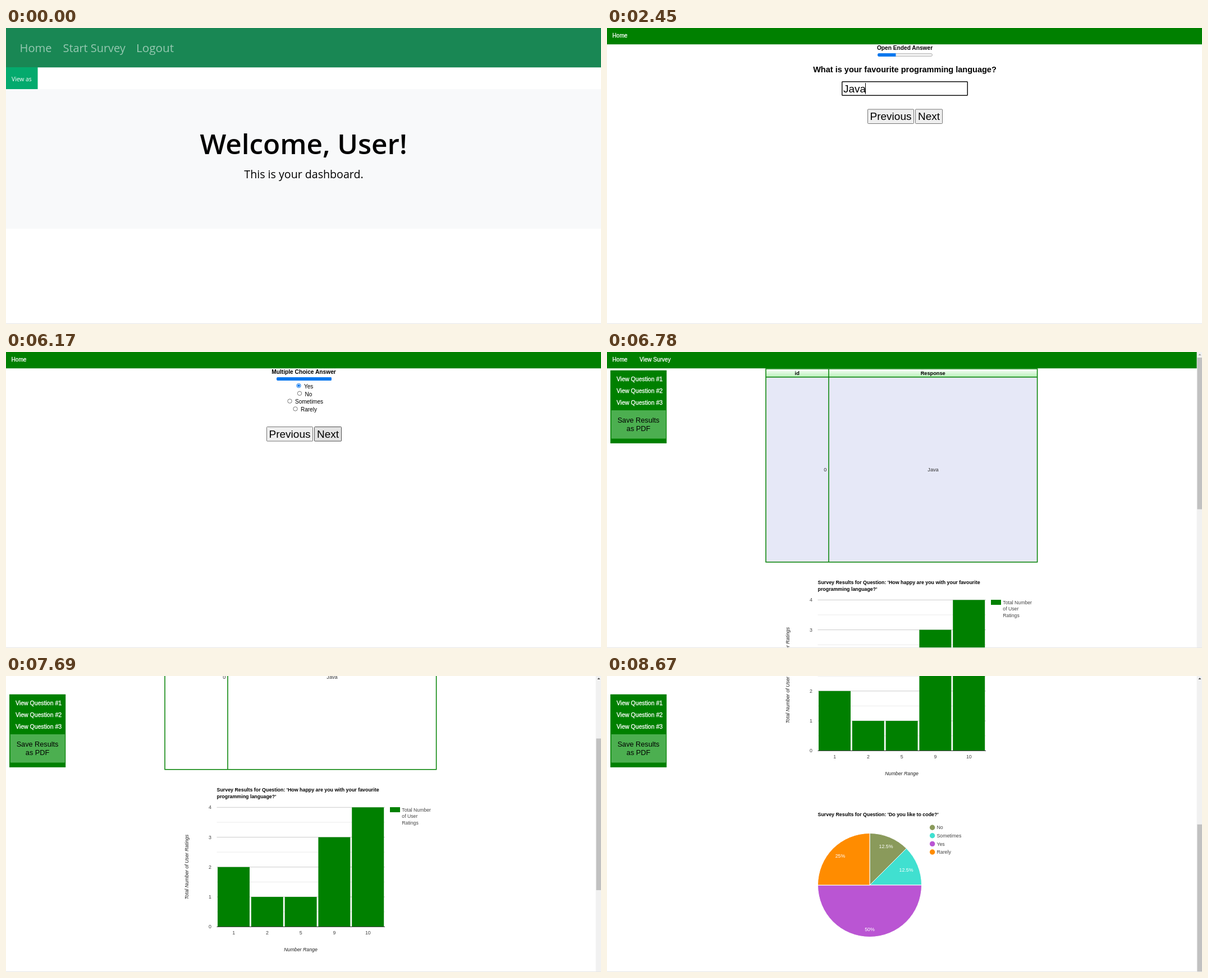
Recreate the animation shown at these times as an HTML page. Size 1060x528 px, loop 9.03 s.

```html
<!DOCTYPE html>
<html lang="en">
<head>
<meta charset="utf-8">
<title>Survey</title>
<style>
html, body { margin: 0; height: 100%; overflow: hidden; background: #fff; }
svg { display: block; font-family: "Liberation Sans", Arial, sans-serif; }
.ui { font-family: "Open Sans", "Noto Sans", sans-serif; }
.b { font-weight: 700; }
.i { font-style: italic; }
.link { stroke: #fff; stroke-width: .3px; }
</style>
</head>
<body>
<svg id="stage" width="1060" height="528" viewBox="0 0 1060 528"></svg>
<script>
const LOOP = 9030, GREEN = '#008000', MID = 530.5;
const stage = document.getElementById('stage');

const rect = (x, y, w, h, fill, more = '') =>
  `<rect x="${x}" y="${y}" width="${w}" height="${h}" fill="${fill}" ${more}/>`;
const text = (x, y, s, size, fill = '#000', anchor = 'start', more = '') =>
  `<text x="${x}" y="${y}" font-size="${size}" fill="${fill}" text-anchor="${anchor}" ${more}>${s}</text>`;
const line = (x1, y1, x2, y2, stroke, w = 1) =>
  `<path d="M${x1} ${y1}L${x2} ${y2}" stroke="${stroke}" stroke-width="${w}"/>`;
const mid = (x, y, s, size, fill, more) => text(x, y, s, size, fill, 'middle', more);
const bold = (y, s, size) => mid(MID, y, s, size, '#000', 'class="b"');
const link = (x, y, s, size) => text(x, y, s, size, '#fff', 'start', 'class="link"');

// Latest [time, value] entry that has begun
const at = (t, steps) => steps.filter(s => s[0] <= t).pop();
const val = (t, steps) => at(t, steps)[1];

function home(t) {
  const ui = 'class="ui"', dim = 'rgba(255,255,255,.55)';
  return rect(0, 0, 1060, 70.3, '#198754')
    + text(24.6, 43, 'Home', 20.1, dim, 'start', ui)
    + text(101.5, 43, 'Start Survey', 19.9, t < 540 ? dim : 'rgba(255,255,255,.75)', 'start', ui)
    + text(232, 43, 'Logout', 20.7, dim, 'start', ui)
    + rect(0, 70, 56.5, 39, '#04aa6d')
    + text(10, 94.5, 'View as', 10.3, '#fff', 'start', ui)
    + rect(0, 109, 1060, 249, '#f8f9fa')
    + mid(530, 224.5, 'Welcome, User!', 49.5, '#000', 'class="ui" font-weight="600"')
    + mid(MID, 268, 'This is your dashboard.', 19.6, '#000', ui);
}

const nav = () => rect(0, 0, 1060, 29.2, GREEN) + link(9.5, 17, 'Home', 10.1);

const header = (title, part) => nav() + bold(39, title, 10.2)
  + rect(482.5, 45.5, 97, 5, '#efefef', 'rx="2.5" stroke="#b5b5b5"')
  + `<path d="M${482 + 97.5 * part} 45H485a3 3 0 0 0 0 6H${482 + 97.5 * part}Z" fill="#0b78ee"/>`
  + (part === 1 ? rect(482, 45, 98, 6, '#0b78ee', 'rx="3"') : '');

function button(x, y, w, label, mode) {
  const [fill, edge] = { hover: ['#e3e3e3', '#4f4f4f'], press: ['#f5f5f5', '#8d8d8d'] }[mode] || ['#efefef', '#767676'];
  return rect(x + .5, y + .5, w - 1, 25.5, fill, `rx="1" stroke="${edge}"`)
    + mid(x + w / 2, y + 19.5, label, 19, '#000');
}

const buttons = (y, mode) => {
  const [which, how] = mode.split(' ');
  return button(464, y, 83, 'Previous', which === 'prev' && how)
    + button(549, y, 49, 'Next', which === 'next' && how);
};

function input(t, y, mode, typed) {
  const [since, value] = at(t, typed);
  const focus = mode === 'focus';
  const caret = 421.5 + [...value].reduce((w, c) => w + 19 * ('Jv'.includes(c) ? .5 : .556), 0);
  return (focus
      ? rect(418.75, y + .75, 223.5, 24.5, '#fff', 'rx="1" stroke="#101010" stroke-width="1.5"')
      : rect(418.5, y + .5, 224, 25, '#fff', `rx="1" stroke="${mode ? '#4f4f4f' : '#767676'}"`))
    + text(421, y + 19.5, value, 19)
    + (focus && t - since < 515 ? rect(Math.floor(caret) - 1, y + 3, 1, 20, '#000') : '');
}

const openQuestion = t => header('Open Ended Answer', 1 / 3)
  + bold(79, 'What is your favourite programming language?', 14.53)
  + input(t, 95, val(t, [[0, ''], [1330, 'hover'], [1470, 'focus'], [3010, '']]),
    [[0, ''], [1470, ''], [1990, 'J'], [2230, 'Ja'], [2370, 'Jav'], [2450, 'Java']])
  + buttons(144.5, val(t, [[0, ''], [2780, 'prev hover'], [2950, ''], [2980, 'next hover'], [3010, 'next press'], [3170, 'next hover']]));

const rangeQuestion = t => header('Number Range Question', 2 / 3)
  + bold(79, 'How happy are you with your favourite programming language?', 14.53)
  + ['Please provide a value between', 0, 'and', 10].map((s, i) => mid(MID, 104.5 + 12.2 * i, s, 10)).join('')
  + input(t, 144, val(t, [[0, 'hover'], [3410, ''], [3710, 'hover'], [3790, 'focus'], [5040, '']]),
    [[0, ''], [3790, ''], [3980, '1'], [4260, '10']])
  + buttons(181, val(t, [[0, ''], [3410, 'next hover'], [3710, ''], [5040, 'next hover'], [5110, 'next press']]));

const choiceQuestion = t => header('Multiple Choice Answer', 1)
  + [['Yes', 521.5], ['No', 523], ['Sometimes', 505.5], ['Rarely', 515.5]].map(([s, x], i) => {
    const y = 60 + 13.8 * i;
    return `<circle cx="${x}" cy="${y}" r="3.7" fill="#fff" stroke="${i ? '#767676' : '#0b78ee'}"/>`
      + (i ? '' : `<circle cx="${x}" cy="${y}" r="2.3" fill="#0b78ee"/>`)
      + text(x + 9.5, y + 4.7, s, 10);
  }).join('')
  + buttons(133, val(t, [[0, ''], [5550, 'prev hover'], [5600, ''], [6170, 'next hover'], [6280, 'next press'], [6360, 'next hover']]));

const table = t => rect(283, 30, 484, 15, 'url(#head)')
  + (t >= 6780 && t < 7200 ? rect(283, 45, 484, 330, '#e6e8f7') : '')
  + `<path d="M283 30H766.6V374.8H283ZM283 44.8H766.6M395 30V374.8" fill="none" stroke="${GREEN}" stroke-width="1.5"/>`
  + mid(338.7, 40.5, 'id', 9.2, '#000', 'class="b"')
  + mid(580.7, 40.5, 'Response', 9.2, '#000', 'class="b"')
  + text(391.4, 212.5, '0', 9.2, '#333', 'end')
  + mid(581, 212.5, 'Java', 9.2, '#333');

function barChart() {
  const size = 8.8, ink = '#444', base = 655.3, unit = 53.25;
  let s = text(375.5, 414, "Survey Results for Question: 'How happy are you with your favourite", 8.85, '#000', 'start', 'class="b"')
    + text(375.5, 425.6, "programming language?'", 8.85, '#000', 'start', 'class="b"');
  for (let v = 0; v <= 4; v += .5) {
    const y = base - v * unit, whole = v % 1 === 0;
    s += line(375.5, y, 675, y, whole ? '#ccc' : '#ebebeb');
    if (whole) s += text(366, y + 3, v, size, ink, 'end');
  }
  [[1, 2], [2, 1], [5, 1], [9, 3], [10, 4]].forEach(([label, n], i) => {
    const x = 377 + 59.8 * i;
    s += rect(x, base - n * unit, 57, n * unit, GREEN) + mid(x + 28.6, 669, label, size, ink);
  });
  s += line(375.5, base, 675, base, '#333')
    + mid(525, 699, 'Number Range', size, '#222', 'class="i"')
    + mid(0, 0, 'Total Number of User Ratings', size, '#222', 'class="i" transform="translate(325 548.7) rotate(-90)"')
    + rect(684, 442, 18, 9, GREEN);
  return s + ['Total Number', 'of User', 'Ratings'].map((w, i) => text(705.3, 449.5 + 11.6 * i, w, 8.7, ink)).join('');
}

function pieChart(t) {
  const cx = 468, cy = 895, r = 92.5;
  const point = turn => `${cx + r * Math.sin(turn * 2 * Math.PI)} ${cy - r * Math.cos(turn * 2 * Math.PI)}`;
  let turn = 0, s = text(375.5, 771.5, "Survey Results for Question: 'Do you like to code?'", 8.85, '#000', 'start', 'class="b"');
  [['No', '#8a9a5b', .125, 497, 304], ['Sometimes', '#40e0d0', .125, 533, 346],
   ['Yes', '#ba55d3', .5, 468, 452], ['Rarely', '#ff8c00', .25, 415.5, 321]].forEach(([name, color, share, x, y], i) => {
    const d = `M${cx} ${cy}L${point(turn)}A${r} ${r} 0 0 1 ${point(turn += share)}Z`;
    if (i === 3 && t >= 8640 && t < 8670)
      s += `<path d="${d}" fill="none" stroke="${color}" stroke-opacity=".3" stroke-width="11"/>`;
    s += `<path d="${d}" fill="${color}" stroke="#fff"/>`
      + mid(x, y + 525, share * 100 + '%', 8.8, '#fff')
      + `<circle cx="579.6" cy="${792.2 + 14.6 * i}" r="4.7" fill="${color}"/>`
      + text(587.4, 795.3 + 14.6 * i, name, 8.8, '#444');
  });
  return s;
}

function results(t) {
  const scroll = val(t, [[0, 0], [7560, 30], [7630, 130], [7690, 208], [7800, 245],
    [8150, 290], [8210, 400], [8290, 490], [8350, 522]]);
  const loaded = t >= 6740;
  let s = `<g transform="translate(0 ${-scroll})">` + nav() + link(58, 17, 'View Survey', 10)
    + (loaded ? table(t) + barChart() + pieChart(t) : '') + '</g>'
    + rect(6, 32.7, 100.2, 130.2, GREEN);
  for (let i = 1; i <= 3; i++) s += link(17, 31 + 21 * i, 'View Question #' + i, 10.5);
  s += rect(7.5, 104, 97.5, 50.5, '#4caf50')
    + mid(56, 126, 'Save Results', 12.7) + mid(56, 140.5, 'as PDF', 12.7);
  if (loaded) s += rect(1050.6, 0, 9.4, 528, '#f1f1f1')
    + rect(1051.5, 10 + .488 * scroll, 8.5, 270.5, '#c1c1c1')
    + `<path d="M1053.5 6h5l-2.5-3z" fill="${scroll ? '#505050' : '#a3a3a3'}"/>`;
  return s;
}

const defs = `<defs><linearGradient id="head" x2="0" y2="1"><stop stop-color="#fff"/>
  <stop offset="1" stop-color="#b4efb4"/></linearGradient></defs>`;
let shown = '';

function frame(now) {
  const t = now % LOOP;
  const page = val(t, [[0, home], [890, openQuestion], [3230, rangeQuestion], [5270, choiceQuestion], [6580, results]]);
  const markup = defs + page(t) + rect(0, 527, 1060, 1, '#e6e6e6');
  if (markup !== shown) stage.innerHTML = shown = markup;
  requestAnimationFrame(frame);
}
frame(0);
</script>
</body>
</html>
```
